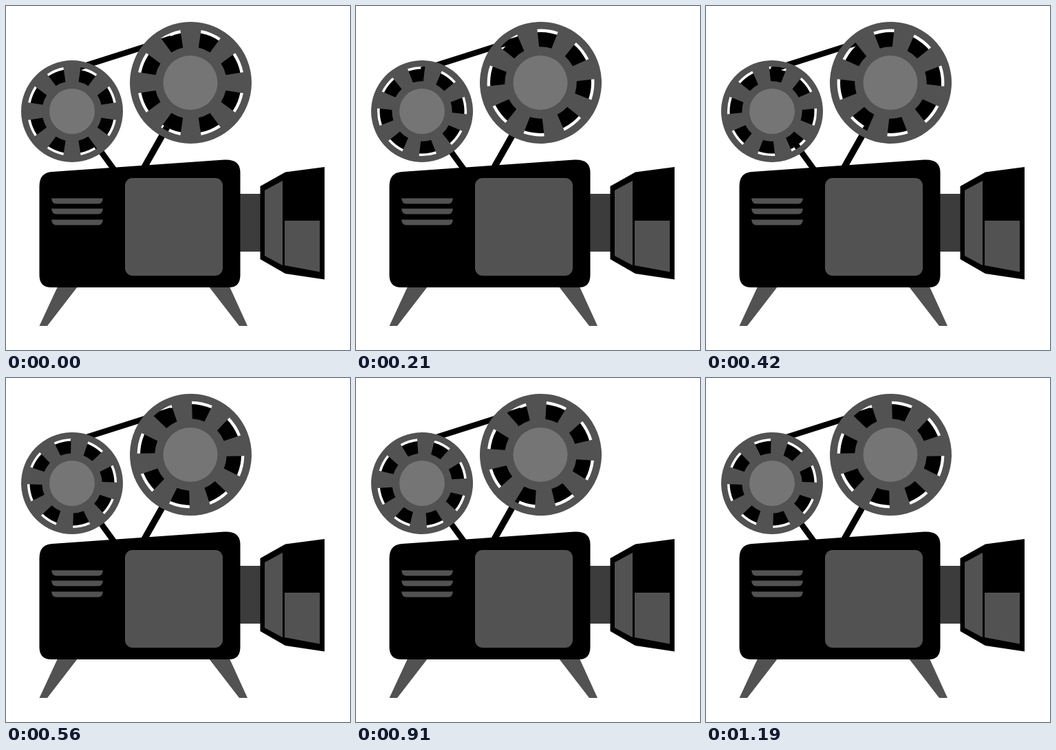
Write an HTML page that moves like this. It is 500 by 500 pixels and loops after 1260 ms.

```html
<!DOCTYPE html>
<html lang="en">
<head>
<meta charset="utf-8">
<title>Film camera</title>
<style>
  html, body { margin: 0; width: 100%; height: 100%; overflow: hidden; background: #fff; }
  svg { display: block; width: 100vw; height: 100vh; }
</style>
</head>
<body>
<svg viewBox="0 0 500 500">
  <defs>
    <path id="vent" d="M66 279.5H141Q140 287.5 134 287.5H73Q67 287.5 66 279.5Z"/>
  </defs>

  <!-- film strip and wound film -->
  <g stroke="#000">
    <path d="M95 93L240 47" stroke-width="8.5"/>
    <path d="M234 176L200 236" stroke-width="9.5"/>
    <path d="M126 195L158 239" stroke-width="8.5"/>
  </g>
  <circle cx="96" cy="153" r="61.5"/>
  <circle cx="268.5" cy="111.5" r="73.5"/>

  <g fill="#525252">
    <path id="small" fill-rule="evenodd"/>
    <path id="big" fill-rule="evenodd"/>
    <path d="M75 408H104L60 465H48.500Z"/>
    <path d="M295 408H325L351 465H339Z"/>
  </g>
  <g fill="#757575">
    <circle cx="96" cy="153" r="33"/>
    <circle cx="268" cy="111.500" r="39.500"/>
  </g>

  <!-- body and lens -->
  <path fill="#3c3c3c" d="M340 273H371V357H340Z"/>
  <path d="M48.500 262Q48.500 242 67 241L317 223.500Q340.500 222 340.500 242V391Q340.500 409 324 409H66Q48.500 409 48.500 391Z"/>
  <path d="M369.500 262L406 241.500L463 234V397.500L406 389L369.500 368Z"/>
  <g fill="#525252">
    <rect x="173" y="250" width="142" height="142" rx="11"/>
    <use href="#vent"/>
    <use href="#vent" y="15"/>
    <use href="#vent" y="31"/>
    <path d="M376 268L402 254V377L376 363Z"/>
    <path d="M405 312H456V386.500L405 377Z"/>
  </g>
</svg>

<script>
  const STEP = 70, FRAMES = 18, TURN = 10;

  // Disc of radius R around the origin with eight tapered windows
  function reelPath(R) {
    const inner = R * 0.59, outer = R * 0.88;
    const at = (r, deg) => {
      const a = deg * Math.PI / 180;
      return `${r * Math.cos(a)} ${r * Math.sin(a)}`;
    };
    let d = `M${-R} 0A${R} ${R} 0 1 1 ${R} 0A${R} ${R} 0 1 1 ${-R} 0Z`;
    for (let mid = 22.5; mid < 360; mid += 45) {
      d += `M${at(inner, mid - 10)}L${at(outer, mid - 11.3)}` +
           `A${outer} ${outer} 0 0 1 ${at(outer, mid + 11.3)}` +
           `L${at(inner, mid + 10)}A${inner} ${inner} 0 0 0 ${at(inner, mid - 10)}Z`;
    }
    return d;
  }

  const reels = [
    { id: 'small', x: 96, y: 153, r: 74, dir: -1 },
    { id: 'big', x: 268.5, y: 111.5, r: 88.5, dir: 1 }
  ];
  for (const reel of reels) {
    reel.el = document.getElementById(reel.id);
    reel.el.setAttribute('d', reelPath(reel.r));
  }

  const start = performance.now();
  function draw(now) {
    const step = Math.floor(Math.max(0, now - start) / STEP) % FRAMES;
    for (const { el, x, y, dir } of reels) {
      el.setAttribute('transform', `translate(${x} ${y}) rotate(${dir * TURN * step})`);
    }
    requestAnimationFrame(draw);
  }
  draw(start);
</script>
</body>
</html>
```
